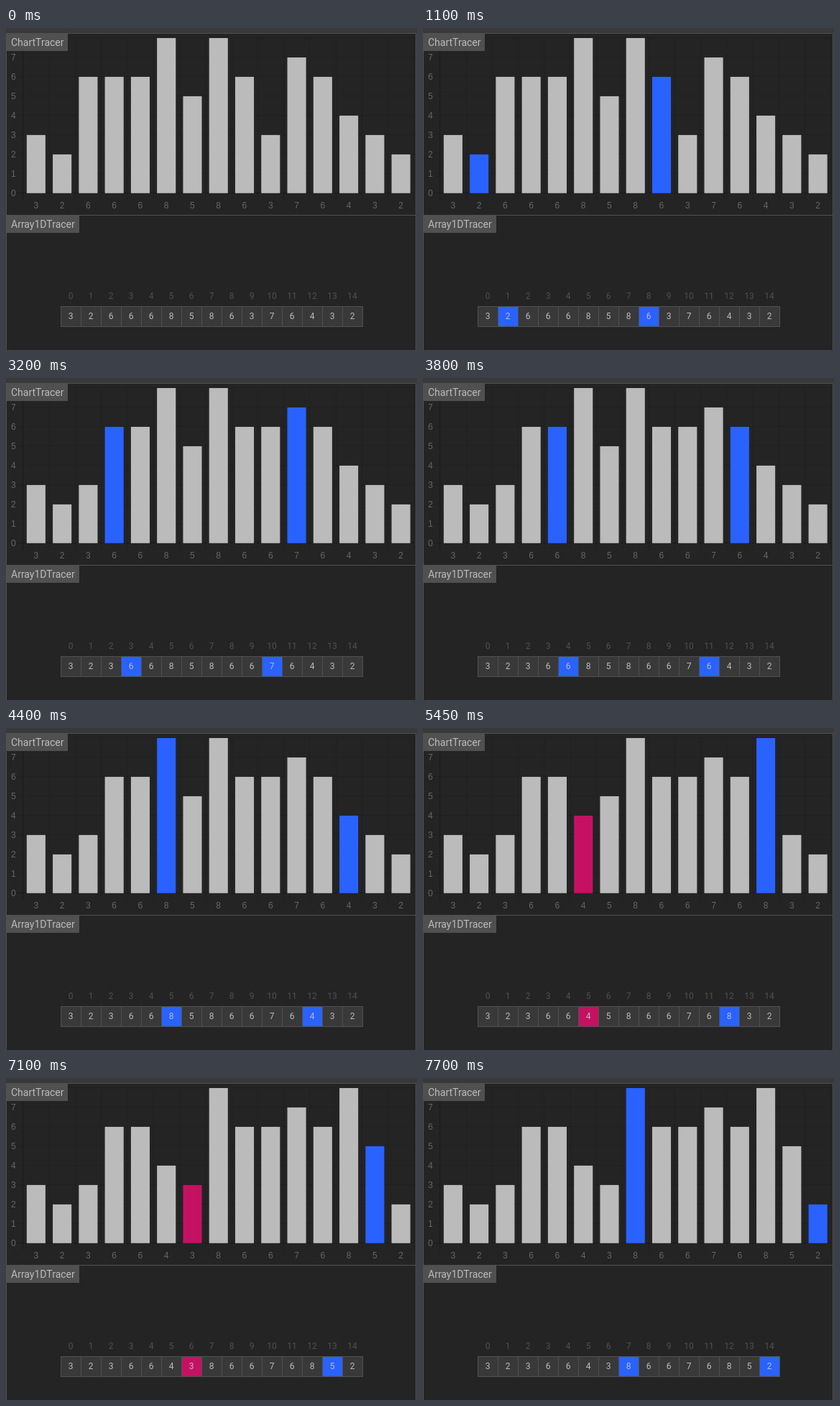
Recreate the animation shown at these times as an HTML page. Size 572 by 448 pixels, loop 8 s.

```html
<!DOCTYPE html>
<html lang="en">
<head>
<meta charset="utf-8">
<title>Shell sort tracers</title>
<style>
  html, body { margin: 0; width: 100%; height: 100%; overflow: hidden; background: #242424; }
  svg { display: block; width: 572px; height: 448px; }
  .title { font: 14px Roboto, sans-serif; fill: #bbb; }
  .tick { font: 12px "Liberation Sans", Arial, sans-serif; fill: #666; }
  .index, .value { font: 12px Roboto, sans-serif; }
  .index { fill: #505050; }
  .value { fill: #bbb; }
  .mid { text-anchor: middle; }
  .end { text-anchor: end; }
</style>
</head>
<body>
<svg id="stage" viewBox="0 0 572 448"></svg>
<script>
const LOOP = 8000, GAP = 7;
const START = [3, 2, 6, 6, 6, 8, 5, 8, 6, 3, 7, 6, 4, 3, 2];
const BLUE = '#2962ff', PINK = '#c51162', BAR = '#bbb', CELL = '#393939', LINE = '#505050';
const BASE = 229.8, UNIT = 26.98, PITCH = 36.27;

// start time, lower index of the compared pair, then an optional write: index, value
const STEPS = [
  [500, 0], [1100, 1], [1550, 2], [2150, 2, 9, 6], [2750, 2, 2, 3],
  [3200, 3], [3800, 4], [4400, 5], [4850, 5, 12, 8], [5450, 5, 5, 4],
  [6050, 6], [6500, 6, 13, 5], [7100, 6, 6, 3], [7700, 7]
];

const stage = document.getElementById('stage');

function add(tag, attrs, text = '') {
  const node = document.createElementNS('http://www.w3.org/2000/svg', tag);
  for (const key in attrs) node.setAttribute(key, attrs[key]);
  node.textContent = text;
  return stage.appendChild(node);
}
const rect = (x, y, width, height, fill) => add('rect', { x, y, width, height, fill });
const label = (x, y, cls, text) => add('text', { x, y, class: cls }, text);

// panels
rect(0, 0, 572, 448, '#242424');
rect(0, 0, 572, 7, CELL);
rect(571, 7, 1, 441, CELL);
rect(0, 7, 571, 1, LINE);
rect(0, 260, 571, 1, LINE);
rect(0, 7, 1, 441, LINE);
rect(570, 7, 1, 441, LINE);

// chart grid
for (let v = 0; v <= 8; v++) {
  const y = Math.round(BASE - v * UNIT) - 1;
  rect(14, y, 554, 1, `rgba(0,0,0,${v ? 0.1 : 0.25})`);
  if (v < 8) label(13.7, y + 4.5, 'tick end', v);
}
for (let i = 0; i <= START.length; i++) {
  rect(Math.round(23.4 + i * PITCH), 14, 1, 226, `rgba(0,0,0,${i ? 0.1 : 0.25})`);
}

rect(76, 387, 421, 29, LINE);
const columns = START.map((_, i) => {
  const x = 28.8 + i * PITCH, cellX = 77 + i * 28;
  const bar = rect(x, 0, 26.1, 0, BAR);
  const tick = label(x + 13, 250.5, 'tick mid', '');
  label(cellX + 13, 377, 'index mid', i);
  const cell = rect(cellX, 388, 27, 27, CELL);
  const value = label(cellX + 13, 405, 'value mid', '');
  return { bar, tick, cell, value };
});

function title(y, width, text) {
  rect(1, y, width, 24, LINE);
  label(7, y + 17, 'title', text);
}
title(8, 85, 'ChartTracer');
title(261, 101, 'Array1DTracer');

function show(time) {
  const values = START.slice();
  let low = -99, written;
  for (const [at, first, index, value] of STEPS) {
    if (time < at) break;
    low = first;
    written = index;
    if (index !== undefined) values[index] = value;
  }
  columns.forEach(({ bar, tick, cell, value }, i) => {
    const mark = i === written ? PINK : i === low || i === low + GAP ? BLUE : null;
    const height = values[i] * UNIT;
    bar.setAttribute('y', BASE - height);
    bar.setAttribute('height', height);
    bar.setAttribute('fill', mark || BAR);
    cell.setAttribute('fill', mark || CELL);
    tick.textContent = value.textContent = values[i];
  });
}

const origin = performance.now();
function frame() {
  show((performance.now() - origin) % LOOP);
  requestAnimationFrame(frame);
}
show(0);
requestAnimationFrame(frame);
</script>
</body>
</html>
```
